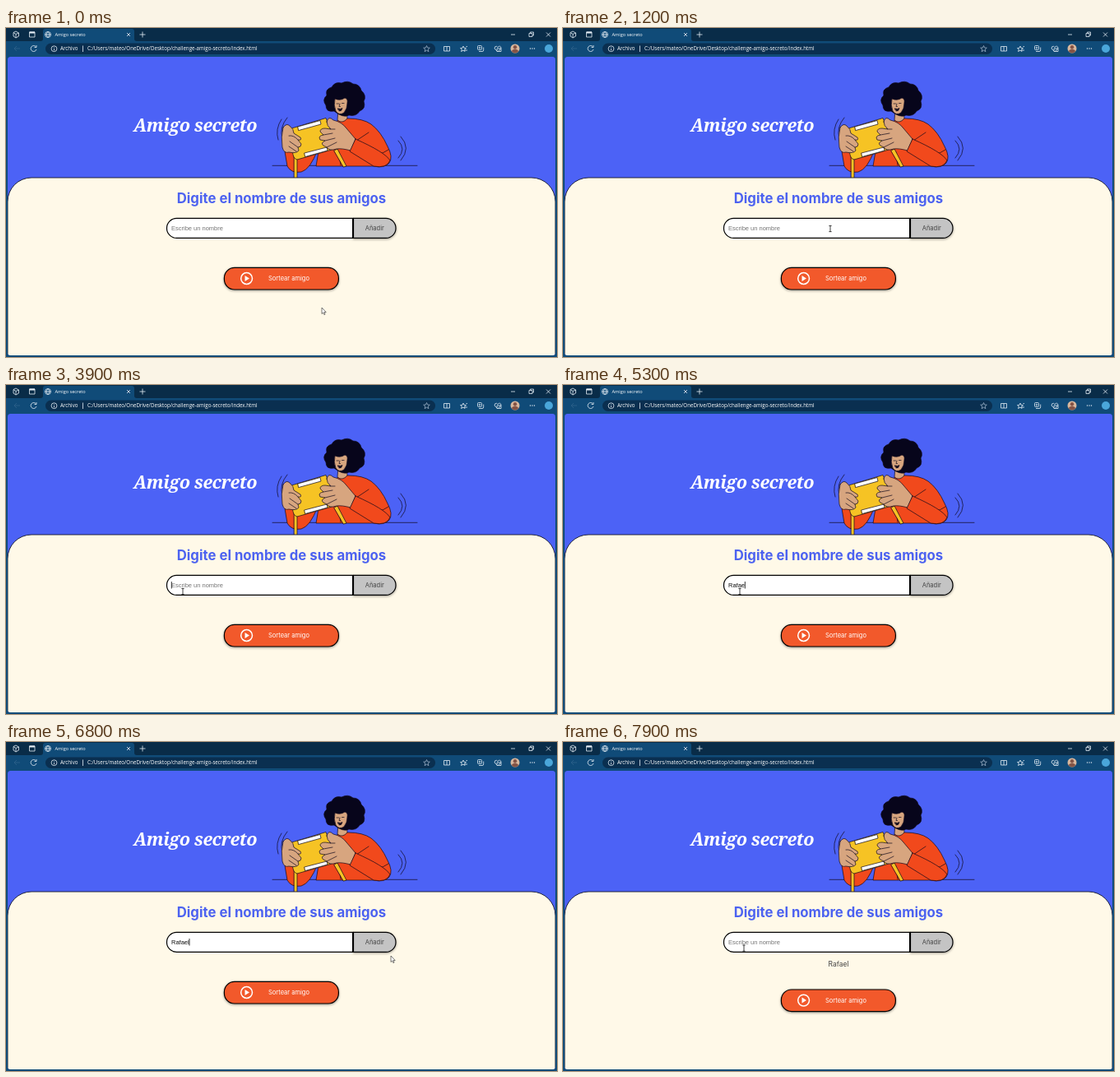
Animation, 670 px wide and 400 px high, one loop 8000 ms. Source, as an HTML page:

```html
<!DOCTYPE html>
<html lang="es">
<head>
<meta charset="utf-8">
<title>Amigo secreto</title>
<style>
html, body { margin: 0; width: 100%; height: 100%; overflow: hidden; background: #104b78; }
svg { display: block; }
text { font-family: Inter, sans-serif; }
.ui { font-family: "Open Sans", sans-serif; font-size: 6.2px; fill: #fff; }
.field { font-family: "Liberation Sans", Arial, sans-serif; font-size: 7.5px; }
.icon { fill: none; stroke: #e4ecf4; stroke-width: .8; }
.art { stroke: #100a1c; stroke-width: .7; stroke-linejoin: round; stroke-linecap: round; }
.line { fill: none; }
.red { fill: #f1491c; }
.skin { fill: #d7a57f; }
.gold { fill: #f6c324; }
.shadow { filter: drop-shadow(0 1.5px 1.5px #0006); }
.box { stroke: #000; stroke-width: 1.2; }
</style>
</head>
<body>
<svg width="670" height="400" viewBox="0 0 670 400">
  <!-- browser window -->
  <rect width="670" height="400" fill="#104b78"/>
  <rect width="670" height="16" fill="#092c48"/>
  <path d="M42 16Q45 16 45 13V4Q45 1 48 1H153Q156 1 156 4V13Q156 16 159 16Z" fill="#104b78"/>
  <rect x="48" y="18.5" width="474" height="13.5" rx="6.7" fill="#0a2f50"/>
  <g class="icon">
    <path d="M9 5.5L12 4L15.5 6V10L12 12L9 10ZM9 5.5L12 7.5L15.5 6M12 7.5V12"/>
    <path d="M28.5 5H35V11H28.5Z"/>
    <circle cx="51" cy="8" r="3.5"/>
    <path d="M47.5 8H54.5M51 4.5Q47.5 8 51 11.5Q54.5 8 51 4.5"/>
    <path d="M147 6L151 10M151 6L147 10M162.5 8H169.5M166 4.5V11.5"/>
    <path d="M614 8H619M636 6.500H640V10.500H636ZM637.500 6.500V5H641.500V9H640M657 5.500L662 10.500M662 5.500L657 10.500"/>
    <path d="M17 25H10M13 22L10 25L13 28" stroke="#2f628c"/>
    <path d="M36.5 23A3.500 3.500 0 1 0 37 26M37 21V23.500H34.500"/>
    <circle cx="58.5" cy="25.200" r="3.400"/>
    <path d="M58.5 23V23.600M58.500 24.800V27.300M93.500 21.500V29"/>
    <path d="M511.5 21.500L512.600 24L515.300 24.200L513.200 26L513.900 28.700L511.500 27.200L509.100 28.700L509.800 26L507.700 24.200L510.400 24Z" stroke="#9db3c8"/>
    <path d="M532.500 22.500H539.500V28H532.500ZM536 22.500V28"/>
    <path d="M556 22L557 24.300L559.500 24.500L557.600 26L558 28.500L556 27.200L553.500 28.500L554.300 26L552.500 24.500L555 24.300ZM558 27H561M559.500 22.500H561"/>
    <rect x="573.500" y="21.500" width="5" height="5" rx="1"/>
    <path d="M575 28.500H579Q580.700 28.500 580.700 27V23.500M576 22.800V25.400M574.700 24.100H577.300"/>
    <path d="M597.500 28.500L594 25Q594 22 596.500 22.300L597.700 23.400Q601.500 20.500 602 24.500L599 28M597 25H602V28.500H597Z"/>
  </g>
  <g fill="#e4ecf4"><rect x="28.500" y="4.500" width="6.500" height="2"/><circle cx="637.500" cy="25" r=".7"/><circle cx="640" cy="25" r=".7"/><circle cx="642.500" cy="25" r=".7"/></g>
  <circle cx="619" cy="25" r="5.500" fill="#d8b79d"/>
  <path d="M614.500 28Q619 23 623.500 28Q619 33 614.500 28" fill="#855446"/>
  <circle cx="619" cy="23.300" r="2.200" fill="#855446"/>
  <circle cx="660" cy="25" r="5" fill="#4aa6da"/>
  <text class="ui" x="59.500" y="10.200" style="font-size:5.6px">Amigo secreto</text>
  <text class="ui" x="66" y="27.300">Archivo</text>
  <text class="ui" x="99" y="27.300">C:/Users/mateo/OneDrive/Desktop/challenge-amigo-secreto/index.html</text>

  <!-- page -->
  <clipPath id="page"><rect x="2" y="35" width="666" height="363" rx="3.500"/></clipPath>
  <g clip-path="url(#page)">
    <rect y="34" width="670" height="366" fill="#4c62f6"/>
    <text x="155" y="126" style="font:italic bold 21.6px 'Noto Serif',serif; letter-spacing:-.02em" fill="#fff">Amigo secreto</text>

    <g class="art">
      <path class="line" d="M324 167.300H500M331 136Q327 123 335 111M336 134Q332 121 342 109M477 137Q487 147 477 158M480 132Q493 146 480 161"/>
      <path class="red" d="M398 116Q405 110 416 110Q434 110 444 117Q456 126 464 144Q471 157 466 164Q460 171 447 168H377L380 150L397 126Z"/>
      <path class="red" d="M339 150L342 168Q347 177 359 175Q370 172 379 148Z"/>
      <path class="line" d="M423 139L441 127M441 153Q452 157 465 148M405 151L407 167"/>
      <path class="skin" d="M404 98L403 112Q409 117 415 110L414 97Z"/>
      <path d="M399 101Q389 103 389 94Q384 87 390 82Q388 74 396 72Q400 65 408 67Q416 63 422 68Q430 68 432 76Q439 82 435 89Q438 98 430 101Q426 108 417 106Q410 110 399 101Z" fill="#07051b"/>
      <path class="skin" d="M400 86Q398 94 401 101Q405 107 411 103Q415 98 415 91Q416 86 412 85Q406 89 400 86Z"/>
      <path class="line" d="M402 92H404.500M408.500 91.500H411M406 92L405 95.500H406.500"/>
      <path d="M403.500 98Q407 99 409 97.500Q408 101.500 405.500 101Z" fill="#100a1c"/>
      <path class="gold" d="M350.500 156H354V183H350.500ZM399 149L403 147L414 168L410.500 169Z"/>
      <path class="gold" d="M344 123L389 109.500L403 146L354 160Q350 159 349 154Z"/>
      <path d="M355 120L382 112.500L383 117L356 124.500ZM363 152L390 145L391 149L364 156.500Z" fill="#fff"/>
      <path class="skin" d="M337 121Q341 115 345 119Q350 123 350 128L358 133Q360 137 355 136L359 141Q359 145 355 145L356 149Q353 153 344 151Q338 153 336 145Q334 132 337 121Z"/>
      <path class="line" d="M344 131Q350 130 355 136M345 138L355 145M344 144L353 150"/>
      <path class="skin" d="M390 114Q392 106 398 112Q408 114 414 122L425 135L419 149Q408 146 402 147Q393 150 390 145L386 143Q382 140 388 137L382 136Q379 131 386 130L382 126Q382 122 388 122L395 123Q390 119 390 114Z"/>
      <path class="line" d="M386 130L397 128M388 137L400 134M390 145L402 139M395 123L400 123"/>
      <path class="red" d="M425 135L418 150L447 168Q463 171 467 161Q461 151 425 135Z"/>
    </g>

    <path d="M2 400V211A29 29 0 0 1 31 182H639A29 29 0 0 1 668 211V400Z" fill="#fff9e8" stroke="#15182c" stroke-width=".9"/>
    <text x="335" y="212.600" text-anchor="middle" font-size="16.750" font-weight="700" fill="#4c62f0">Digite el nombre de sus amigos</text>
    <path class="box" d="M422 231.400H207.500A12 12 0 0 0 207.500 255.400H422Z" fill="#fff"/>
    <path id="add" class="box shadow" d="M422.500 231.400H462A12 12 0 0 1 462 255.400H422.500Z" fill="#c4c4c4"/>
    <path d="M422 231V256" stroke="#000" stroke-width="2"/>
    <text x="448.300" y="246" text-anchor="middle" font-size="7.500" fill="#444">Añadir</text>
    <text id="value" class="field" x="201" y="245.700"></text>
    <path id="caret" d="M0 239V247.500" stroke="#000" stroke-width=".8"/>
    <text id="friend" x="335" y="273" text-anchor="middle" font-size="8.500" fill="#444"></text>
    <g id="draw">
      <rect id="drawBox" class="box shadow" x="265.400" y="291.400" width="139" height="26.600" rx="12.500"/>
      <circle cx="292.600" cy="304.500" r="6.900" fill="none" stroke="#fff" stroke-width="1.500"/>
      <path d="M290.500 301L296 304.500L290.500 308Z" fill="#fff"/>
      <text x="344" y="307.300" text-anchor="middle" font-size="7.500" fill="#fff">Sortear amigo</text>
    </g>
  </g>

  <!-- pointers, hot spot at 0,0 -->
  <g id="pointer">
    <path id="arrow" d="M0 0V7.500L1.700 6L2.900 8.600L4.100 8L2.900 5.500H5.200Z" fill="#fff" stroke="#222" stroke-width=".6"/>
    <path id="beam" d="M-1.600 -3.600H1.600M0 -3.600V3.600M-1.600 3.600H1.600" stroke="#111" stroke-width=".8"/>
    <path id="hand" d="M-.8 0Q0 -1 .8 0V3L4 4V7L3 9H-.5L-3 5.500L-2 4.800L-.8 6Z" fill="#fff" stroke="#222" stroke-width=".6"/>
  </g>
</svg>
<script>
const $ = id => document.getElementById(id);
const NAME = "Rafael", LOOP = 8000, CLICK = 7100, GRAY = "#c4c4c4";
const typedAt = [4100, 4700, 4900, 5100, 5300, 5700];
const caretOn = [[1700, 2300], [2800, 3300], [3900, 4600], [4700, 6200], [6700, CLICK]];
// time, x, y
const path = [
  [800, 384, 340], [1200, 325, 244], [1700, 215, 251], [6300, 215, 251],
  [6800, 468, 260], [6900, 462, 250], [7200, 462, 250], [7600, 220, 250], [7900, 220, 250.6]
];

function pointerAt(t) {
  const i = path.findIndex(p => p[0] > t);
  if (i === 0) return path[0].slice(1);
  if (i < 0) return path[path.length - 1].slice(1);
  const [a, b] = [path[i - 1], path[i]];
  const k = (t - a[0]) / (b[0] - a[0]);
  return [1, 2].map(n => a[n] + (b[n] - a[n]) * k);
}

const inside = ([x, y], l, t, r, b) => x > l && x < r && y > t && y < b;
const show = (id, on) => $(id).style.display = on ? "" : "none";

function render(t) {
  const added = t >= CLICK, shift = added ? 9.6 : 0;
  const text = added ? "" : NAME.slice(0, typedAt.filter(s => s <= t).length);
  const value = $("value");
  value.textContent = text || "Escribe un nombre";
  value.setAttribute("fill", text ? "#111" : "#757575");
  const caretX = 201 + (text ? value.getComputedTextLength() : 0);
  $("caret").setAttribute("transform", `translate(${caretX + .3})`);
  show("caret", caretOn.some(([a, b]) => t >= a && t < b));
  $("friend").textContent = added ? NAME : "";
  $("draw").setAttribute("transform", `translate(0 ${shift})`);

  const p = pointerAt(t);
  const onField = inside(p, 195, 231, 422, 256);
  const onAdd = inside(p, 422, 231, 475, 256);
  const onDraw = inside(p, 265, 291 + shift, 405, 318 + shift);
  $("add").setAttribute("fill", onAdd ? "#a1a1a1" : GRAY);
  $("drawBox").setAttribute("fill", onDraw ? "#e24b1f" : "#f2592b");
  show("beam", onField);
  show("hand", onAdd || onDraw);
  show("arrow", !onField && !onAdd && !onDraw);
  $("pointer").setAttribute("transform", `translate(${p})`);
}

const start = performance.now();
function tick() {
  // the picture steps ten times a second
  render(Math.floor((performance.now() - start) % LOOP / 100) * 100);
  requestAnimationFrame(tick);
}
tick();
</script>
</body>
</html>
```
